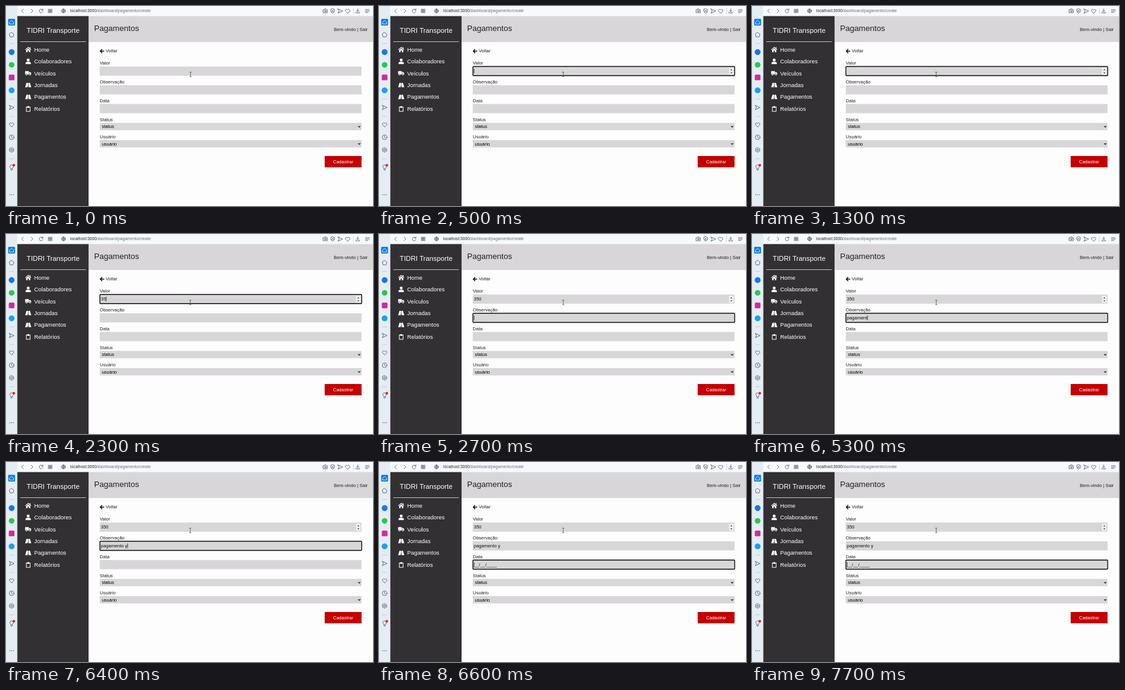
An HTML page that plays this animation: 600 px wide and 328 px high, repeating every 8000 ms.

```html
<!DOCTYPE html>
<html lang="pt-BR">
<head>
<meta charset="utf-8">
<style>
html, body { margin: 0; width: 100%; height: 100%; overflow: hidden; background: #fdfdfd; }
svg { display: block; width: 600px; height: 328px; }
text { font: 7.5px "Liberation Sans", Arial, sans-serif; fill: #222; white-space: pre; }
.menu text { font-size: 9.375px; fill: #fff; }
.line { fill: none; stroke: #46505a; stroke-width: .8; stroke-linejoin: round; stroke-linecap: round; }
.field { fill: #d8d6d8; }
</style>
</head>
<body>
<svg viewBox="0 0 600 328">
  <defs>
    <path id="send" d="M-3.8-3.5 4 0-3.8 3.5-2 0z"/>
    <path id="heart" d="M0 3.4-3.2.2C-5-2-1.8-4.6 0-2 1.8-4.6 5-2 3.2.2z"/>
    <path id="home" d="M-5 .2 0-4.3 2.4-2.1V-3.7H3.7V-1L5 .2 4.2 1 0-2.7-4.2 1zM-3.4 1.2 0-1.8 3.4 1.2V4.4H1V1.6H-1V4.4H-3.4z"/>
    <path id="user" d="M0-4.6A2.4 2.4 0 0 1 0 .2 2.4 2.4 0 0 1 0-4.6M-4.4 4.4V3.2Q-4.2.8-1.8.8H1.8Q4.2.8 4.4 3.2V4.4z"/>
    <g id="truck">
      <path d="M-5-3.5H1V2.4H-5zM1.5-2H3.3L5 .1V2.4H1.5z"/>
      <g stroke="#323032" stroke-width=".7"><circle cx="-2.8" cy="2.5" r="1.4"/><circle cx="2.9" cy="2.5" r="1.4"/></g>
    </g>
    <path id="road" d="M-2.8-3.6H-.4L-.5-2H.5L.4-3.6H2.8L5 3.6H.8L.7 1.3H-.7L-.8 3.6H-5zM-.5-1.1-.6.5H.6L.5-1.1z"/>
    <path id="clip" fill-rule="evenodd" d="M-3.6-3.6H-1.5Q0-5.6 1.5-3.6H3.6V4.7H-3.6zM-2.6-2.6V3.7H2.6V-2.6H1.8V-1.6H-1.8V-2.6z"/>
    <path id="drop" d="M-1.8-.9 0 .9 1.8-.9" fill="none" stroke="#111" stroke-width="1.1"/>
  </defs>

  <!-- browser bars -->
  <path fill="#f7fafd" d="M0 0H600V16.500H0z"/>
  <path fill="#e5edf4" d="M0 0H18.500V328H0z"/>
  <g class="line">
    <path d="M28.500 5 25.500 8 28.500 11M41 5 44 8 41 11M60 6.500A3 3 0 1 0 60.300 9M60.300 4.700V6.800H58.200"/>
    <path d="M69.500 5.300H71.700V7.500H69.500zM73 5.300H75.200V7.500H73zM69.500 8.700H71.700V10.900H69.500zM73 8.700H75.200V10.900H73z"/>
    <circle cx="94" cy="8" r="3.200"/><path d="M90.800 8H97.200M94 4.800Q91.500 8 94 11.200 96.500 8 94 4.800"/>
    <path d="M518.700 6H520.300L521 4.800H523L523.700 6H525.300V11H518.700z"/><circle cx="522" cy="8.300" r="1.400"/>
    <path d="M534 4.600 537 5.600V8Q537 10.500 534 11.500 531 10.500 531 8V5.600zM532.800 7 535.200 9.400M535.200 7 532.800 9.400"/>
    <use href="#send" x="546.500" y="8.300"/><use href="#heart" x="558.500" y="8.500"/>
    <path d="M568 4V12.500" stroke="#c5ccd2"/>
    <path d="M575 4.500V9M573.200 7.400 575 9.200 576.800 7.400M572 10V11.300H578V10M587.500 6H594M587.500 8.300H594M587.500 10.600H592"/>
  </g>
  <text x="105" y="10.300" style="font-size:6.670px">localhost:3000<tspan fill="#68727b">/dashboard/pagamento/create</tspan></text>

  <rect x="3.500" y="21" width="11.300" height="11" rx="1.500" fill="#0a7cf0"/>
  <path class="line" style="stroke:#fff" d="M6 26.500 9.200 23.500 12.400 26.500V29.500H6z"/>
  <circle cx="9.200" cy="75.600" r="4.800" fill="#1676f3"/>
  <circle cx="9.200" cy="96.500" r="4.600" fill="#24c94f"/>
  <rect x="4.600" y="112.500" width="9.200" height="9.200" rx="1.500" fill="#d5279c"/>
  <circle cx="9.200" cy="138.300" r="4.800" fill="#1b9ff0"/>
  <g class="line">
    <path d="M9.200 43.300 13 46.300 11.600 50.700H6.800L5.400 46.300z"/>
    <use href="#send" x="9.200" y="166.500"/><use href="#heart" x="9.200" y="194.800"/>
    <circle cx="9.200" cy="215.300" r="3.800"/><path d="M9.200 213V215.500L10.800 216.700"/>
    <path d="M9.200 232.200 12.600 234.100V237.900L9.200 239.800 5.800 237.900V234.100z"/><circle cx="9.200" cy="236" r="1.500"/>
    <path d="M7.800 267V265.800C4.500 263 7 260.500 9.200 260.700 12 260.700 13.500 263.500 10.600 265.800V267zM8 269H10.400"/>
    <path stroke="#b9c3cc" d="M6 61.500H12.400M6 152.500H12.400M6 181H12.400M6 250.500H12.400"/>
  </g>
  <circle cx="12.800" cy="261.200" r="2.100" fill="#f01c26"/>
  <g fill="#46505a"><circle cx="6.300" cy="309.500" r=".7"/><circle cx="9.200" cy="309.500" r=".7"/><circle cx="12.100" cy="309.500" r=".7"/></g>

  <!-- page frame -->
  <path fill="#323032" d="M18.500 16.500H135V328H18.500z"/>
  <path class="field" d="M135 16.500H600V59H135z"/>
  <path stroke="#e8e8e8" stroke-width=".8" d="M23.500 58.500H130.500"/>
  <text x="77" y="44" text-anchor="middle" style="font-size:11.250px;fill:#fff">TIDRI Transporte</text>
  <text x="144" y="40.800" style="font-size:13.100px">Pagamentos</text>
  <text x="536" y="40.500">Bem-vindo | Sair</text>
  <g class="menu" id="menu" fill="#fff"></g>

  <!-- form -->
  <path d="M160.500 74H154.500M157.300 70.800 154.200 74 157.300 77.200" fill="none" stroke="#111" stroke-width="1.500"/>
  <text x="163" y="76">Voltar</text>
  <g id="form"></g>
  <use href="#drop" x="577.500" y="197.800"/><use href="#drop" x="577.500" y="226"/>
  <text x="156.700" y="200.300" style="fill:#000">status</text>
  <text x="156.700" y="228.500" style="fill:#000">usuário</text>
  <path fill="#c40000" d="M521 246H581.300V264.500H521z"/>
  <text x="551.200" y="257.800" text-anchor="middle" style="fill:#fff">Cadastrar</text>

  <g id="spin">
    <path fill="#f4f4f4" d="M572.500 101.500H579.500V112.500H572.500z"/>
    <path fill="#444" d="M574.300 105.500 576 103.300 577.700 105.500zM574.300 108.700 576 110.900 577.700 108.700z"/>
  </g>
  <g id="values"></g>
  <rect id="ring" x="153.500" width="428" height="15" rx="1" fill="none" stroke="#111" stroke-width="1.400"/>
  <path id="caret" d="M0-4V4" stroke="#111" stroke-width=".7"/>
  <path id="mouse" d="M-1.700-3.700H1.700M-1.700 3.700H1.700M0-3.700V3.700" stroke="#555" stroke-width=".8"/>
</svg>
<script>
const $ = id => document.getElementById(id);

$('menu').innerHTML = [
  ['home', 'Home'], ['user', 'Colaboradores'], ['truck', 'Veículos'],
  ['road', 'Jornadas'], ['road', 'Pagamentos'], ['clip', 'Relatórios']
].map(([icon, label], i) => {
  const y = 71.3 + i * 19.45;
  return `<use href="#${icon}" x="36.300" y="${y}"/><text x="46" y="${y + 3.3}">${label}</text>`;
}).join('');

$('form').innerHTML = [
  ['Valor', 99.3, 15], ['Observação', 130, 15], ['Data', 160.7, 15],
  ['Status', 191.7, 12], ['Usuário', 219.9, 12]
].map(([label, y, h]) =>
  `<text x="153.300" y="${y - 3}">${label}</text><rect class="field" x="153.300" y="${y}" width="428" height="${h}"/>`
).join('');

const tops = [99.3, 130, 160.7];
$('values').innerHTML = tops.map(y => `<text x="155" y="${y + 10}" style="fill:#111"></text>`).join('');
const values = [...$('values').children];

// time, field, typed text
const events = [[500, 0, '']];
const type = (field, text, times) =>
  times.forEach((time, i) => events.push([time, field, text.slice(0, i + 1)]));
type(0, '350', [1680, 2080, 2480]);
events.push([2680, 1, '']);
type(1, 'pagamento y', [4080, 4380, 4580, 4680, 4880, 4980, 5180, 5280, 5480, 5980, 6180]);
events.push([6580, 2, '__/__/____']);

const show = (id, on) => $(id).setAttribute('visibility', on ? 'visible' : 'hidden');
const move = (id, x, y) => $(id).setAttribute('transform', `translate(${x} ${y})`);

function draw(now) {
  const t = now % 8000;
  const done = events.filter(e => e[0] <= t);
  const text = ['', '', ''];
  for (const [, field, s] of done) text[field] = s;
  values.forEach((el, i) => {
    if (el.textContent !== text[i]) el.textContent = text[i];
  });

  const last = done[done.length - 1];
  show('spin', last);
  show('ring', last);
  show('caret', last && Math.floor((t - last[0]) / 520) % 2 === 0);
  if (last) {
    const field = last[1];
    const width = field < 2 && text[field] ? values[field].getComputedTextLength() : 0;
    $('ring').setAttribute('y', tops[field]);
    move('caret', 155.5 + width, tops[field] + 7.5);
  }
  move('mouse', t < 300 ? 301.7 : 301.2, 112.2);
  requestAnimationFrame(draw);
}
requestAnimationFrame(draw);
</script>
</body>
</html>
```
